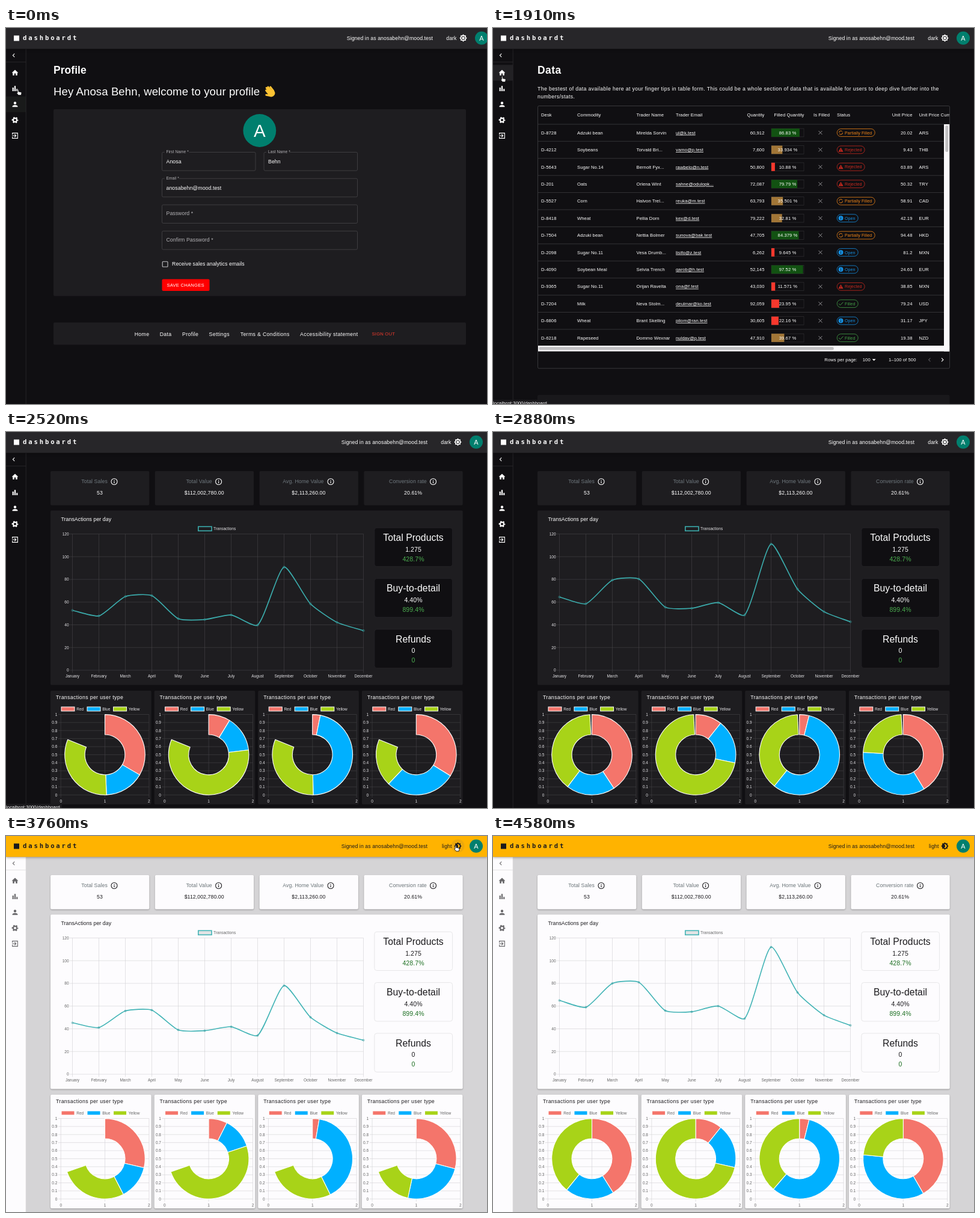
These frames come from a looping animation (800x625 px, 4.61 s). An HTML page:

```html
<!DOCTYPE html>
<html lang="en">
<head>
<meta charset="utf-8">
<title>Dashboard tour</title>
<style>
  html, body { margin: 0; width: 100%; height: 100%; overflow: hidden; background: #100f12; }
  svg { display: block; width: 800px; height: 625px; font-family: "Liberation Sans", Arial, sans-serif; }
  text { white-space: pre; }
  .dark {
    --bg: #100f12; --bar: #272629; --side: #100f12; --edge: #2c2b2e; --card: #1e1d20; --tile: #100f12;
    --tileEdge: #29282b; --fg: #fff; --icon: #fff; --muted: #70797f; --grid: #454447; --tick: #e4e3e6;
    --good: #4caf50; --hover: #3a393c; --teal: #3bacac; --key: none;
  }
  .light {
    --bg: #d5d4d6; --bar: #ffb300; --side: #fdfcfe; --edge: #dddcde; --card: #fdfcfe; --tile: #fdfcfe;
    --tileEdge: #dfdee0; --fg: #1b1a1d; --icon: #69686b; --muted: #697377; --grid: #d2d1d3; --tick: #666;
    --good: #1b6e20; --hover: #eda90c; --teal: #43b4b6; --key: #e2e3e4;
  }
  .card { fill: var(--card); }
  .light .card { filter: drop-shadow(0 1px 1px rgba(0, 0, 0, .3)); }
  .bar { filter: drop-shadow(0 1px 2px rgba(0, 0, 0, .35)); }
  .light .darkOnly, .dark .lightOnly { display: none; }
</style>
</head>
<body>
<svg id="stage" class="dark" viewBox="0 0 800 625"></svg>
<script>
const LOOP = 4610;
const TIME = { data: 300, dash: 2180, light: 3503 };
const RED = '#f4756b', BLUE = '#00b0ff', LIME = '#a8d318', GREEN = '#007f6e';
const USER = { first: 'Anosa', last: 'Behn', email: 'anosabehn@mood.test' };

const stage = document.getElementById('stage');
const $ = id => document.getElementById(id);
const each = (list, fn) => list.map(fn).join('');

// Markup helpers
const text = (x, y, str, o = {}) => `<text x="${x}" y="${y}" font-size="${o.size || 8.72}"
  fill="${o.fill || 'var(--fg)'}" text-anchor="${o.anchor || 'start'}" letter-spacing="${o.ls ?? 0.08}"
  ${o.extra || ''}>${str.replace('&', '&amp;')}</text>`;
const rect = (x, y, w, h, fill, extra = '') =>
  `<rect x="${x}" y="${y}" width="${w}" height="${h}" fill="${fill}" ${extra}/>`;
const card = (x, y, w, h) => rect(x, y, w, h, '', 'rx="2" class="card"').replace('fill=""', '');
const circle = (x, y, r, fill, extra = '') => `<circle cx="${x}" cy="${y}" r="${r}" fill="${fill}" ${extra}/>`;
const path = (d, extra) => `<path d="${d}" ${extra}/>`;
const line = (d, stroke, width = 0.6) => path(d, `fill="none" stroke="${stroke}" stroke-width="${width}"`);
const icon = (x, y, body, fill = 'var(--icon)', k = 0.545) =>
  `<g transform="translate(${x} ${y}) scale(${k}) translate(-12 -12)" fill="${fill}">${body}</g>`;
const shape = d => `<path d="${d}"/>`;

const gear = circle(12, 12, 5.4, 'none', 'stroke="var(--icon)" stroke-width="3.6"') +
  circle(12, 12, 8.2, 'none', 'stroke="var(--icon)" stroke-width="3.4" stroke-dasharray="4.6 3.987" stroke-dashoffset="2.3"');
const chevronLeft = shape('M15.4 7.4L14 6l-6 6 6 6 1.4-1.4L10.8 12z');
const chevronRight = shape('M8.6 16.6L10 18l6-6-6-6-1.4 1.4 4.6 4.6z');
const sun = 'M20 8.7V4h-4.7L12 .7 8.7 4H4v4.7L.7 12 4 15.3V20h4.7l3.3 3.3 3.3-3.3H20v-4.7l3.3-3.3z';
const info = (x, y) => circle(x, y, 5, 'none', 'stroke="var(--fg)" stroke-width="1.1"') +
  line(`M${x} ${y - 0.7}v3.4M${x} ${y - 2.8}v1.2`, 'var(--fg)', 1.1);

function header() {
  return rect(0, 0, 800, 34.7, 'var(--bar)', 'class="bar"') +
    rect(13, 12.5, 9, 9, 'var(--fg)') +
    text(28, 20.3, 'dashboardt', { size: 10.6, ls: 2.85, extra: 'font-weight="700" font-family="DejaVu Sans Mono, monospace"' }) +
    `<g id="account">${text(701, 19.6, 'Signed in as ' + USER.email, { anchor: 'end' })}
      ${circle(751.5, 16.5, 11, 'var(--hover)', 'id="halo"')}
      <g class="darkOnly">${text(740.5, 19.6, 'dark', { anchor: 'end' })}
        ${icon(751.5, 16.7, shape(sun) + circle(12, 12, 5, 'none', 'stroke="var(--bar)" stroke-width="2"'), '#fff')}</g>
      <g class="lightOnly">${text(741.5, 19.6, 'light', { anchor: 'end' })}
        ${icon(751.5, 16.7, shape(sun) + path('M9.5 6.5a6 6 0 1 1 0 11a6 6 0 0 0 0-11z', 'fill="var(--bar)"'), 'var(--fg)')}</g>
      ${circle(782, 16.7, 11, GREEN)}${text(782, 20.7, 'A', { size: 10.9, anchor: 'middle', fill: '#fff' })}</g>`;
}

function sidebar() {
  return rect(0, 35, 33, 590, 'var(--side)') + rect(0, 0, 33, 26.2, '#1a1a1b', 'id="row"') +
    line('M33.2 35V625M0 56.6H33', 'var(--edge)', 0.8) +
    icon(12.8, 45.4, chevronLeft) +
    icon(15, 74.5, shape('M10 20v-6h4v6h5v-8h3L12 3 2 12h3v8z')) +
    icon(15, 100.7, shape('M4 9h4v11H4zm12 4h4v7h-4zm-6-9h4v16h-4z')) +
    icon(15, 126.9, circle(12, 8, 4, 'inherit') .replace('fill="inherit"', '') + shape('M12 14c-2.7 0-8 1.3-8 4v2h16v-2c0-2.7-5.3-4-8-4z')) +
    icon(15, 153, gear) +
    icon(15, 179, shape('M10 15.6L11.5 17l5-5-5-5L10 8.4l2.6 2.6H3v2h9.6z') +
      path('M4 9V4h16v16H4v-5', 'fill="none" stroke="var(--icon)" stroke-width="2"'));
}

function profile() {
  const field = (x, y, w, label, value) => {
    const box = rect(x, y, w, 30.6, 'none', 'rx="2" stroke="#4c4b4e" stroke-width=".7"');
    const grey = { fill: '#b4b3b6' };
    if (!value) return box + text(x + 7, y + 17.2, label + ' *', { ...grey, ls: 0.06 });
    return box + rect(x + 4, y - 1, label.length * 3.3 + 8, 2, 'var(--card)') +
      text(x + 7, y + 1.8, label + ' *', { ...grey, size: 6.54 }) + text(x + 7, y + 18.6, value);
  };
  const links = [[213.7, 'Home'], [255.7, 'Data'], [293, 'Profile'], [337.5, 'Settings'],
    [389.7, 'Terms & Conditions'], [489, 'Accessibility statement']];
  const wave = `<g transform="translate(439.5 106) rotate(-38)" stroke="#fcc233" stroke-linecap="round" stroke-width="3">
    <path d="M-4 2V-6M-1 1V-9M2 1V-8.5M5 2V-6M-5 4L-8.5 0"/><ellipse cy="3.5" rx="4.5" ry="4" fill="#fcc233"/></g>`;
  return text(79, 76, 'Profile', { size: 17.45, extra: 'font-weight="700"' }) +
    text(79, 111.6, `Hey ${USER.first} ${USER.last}, welcome to your profile`, { size: 18.6 }) + wave +
    card(79, 135, 686, 310.5) + circle(421.8, 170.5, 27.4, GREEN) +
    text(421.8, 181.2, 'A', { size: 29.5, anchor: 'middle' }) +
    field(259.5, 206.5, 155.5, 'First Name', USER.first) + field(429, 206.5, 155.5, 'Last Name', USER.last) +
    field(259.5, 250.2, 325, 'Email', USER.email) + field(259.5, 293.9, 325, 'Password') +
    field(259.5, 337.6, 325, 'Confirm Password') +
    rect(260.2, 388.2, 8.8, 8.8, 'none', 'rx="1" stroke="#c4c3c6" stroke-width="1.1"') +
    text(276, 395.2, 'Receive sales analytics emails') +
    rect(259.5, 417.5, 79, 19.6, '#f00', 'rx="2"') + text(267.5, 429.9, 'SAVE CHANGES', { size: 7.63, ls: 0.22 }) +
    card(79, 489.5, 686, 37) + each(links, ([x, s]) => text(x, 511.6, s, { ls: 0.36 })) +
    text(608.5, 511.2, 'SIGN OUT', { size: 7.63, ls: 0.22, fill: '#ef3a2d' });
}

const TRADES = `D-8728|Adzuki bean|Mirelda Sorvin|ul@k.test|60,912|86.83|P|20.02|ARS
D-4212|Soybeans|Torvald Bri...|vamo@p.test|7,600|33.934|R|9.43|THB
D-5643|Sugar No.14|Bernolt Fyx...|rawbelo@n.test|50,800|10.88|R|63.89|ARS
D-201|Oats|Orlena Wint|sahne@odulopk...|72,087|79.79|R|50.32|TRY
D-5527|Corn|Halvon Trel...|reuka@m.test|63,793|35.501|P|58.91|CAD
D-8418|Wheat|Pellia Dorn|kex@d.test|79,222|32.81|O|42.19|EUR
D-7504|Adzuki bean|Nettia Bolmer|sunova@bak.test|47,705|84.379|P|94.48|HKD
D-2098|Sugar No.11|Vesa Drumb...|lisifo@z.test|6,262|9.645|O|81.2|MXN
D-4090|Soybean Meal|Selvia Trench|garob@h.test|52,145|97.52|O|24.63|EUR
D-9365|Sugar No.11|Orijan Ravelta|ona@f.test|43,030|11.571|R|38.85|MXN
D-7204|Milk|Neva Stolm...|deulmar@ko.test|92,059|23.95|F|79.24|USD
D-6806|Wheat|Brant Skelling|pilom@ran.test|30,605|22.16|O|31.17|JPY
D-6218|Rapeseed|Dommo Wexnar|nuldav@p.test|47,910|39.67|F|19.38|NZD`.split('\n').map(r => r.split('|'));

const CHIPS = {
  P: ['Partially Filled', 63, '#ec8419', (x, y, c) => circle(x, y, 3, 'none', `stroke="${c}" stroke-dasharray="7.4 2"`)],
  R: ['Rejected', 46, '#c8291f', (x, y, c) => path(`M${x} ${y - 3.6}l4 7h-8z`, `fill="${c}"`) + line(`M${x} ${y - 1}v2.2m0 .6v.8`, '#100f12', 0.8)],
  O: ['Open', 35, '#158fe0', (x, y, c) => circle(x, y, 4, c) + line(`M${x} ${y - 0.4}v2.6m0-4.6v1`, '#100f12', 0.8)],
  F: ['Filled', 35, '#43a047', (x, y, c) => line(`M${x - 3.5} ${y}l2.5 2.5l5-5`, c, 1)]
};

function dataPage() {
  const cell = (x, y, s, o) => text(x, y, s, { size: 7.63, ...o });
  const end = { anchor: 'end' }, wide = { ls: 0.37 };
  const row = ([desk, goods, trader, email, qty, filled, status, price, money], i) => {
    const c = 174 + i * 28.42, y = c + 2.7;
    const [label, w, color, mark] = CHIPS[status];
    const fill = filled > 70 ? '#125212' : filled > 30 ? '#a17637' : '#f8382d';
    return cell(80, y, desk) + cell(140, y, goods) + cell(238.5, y, trader) +
      cell(304, y, email, { extra: 'text-decoration="underline"' }) + cell(451.5, y, qty, end) +
      rect(463, c - 6.9, 54, 13.8, 'none', 'stroke="#353437" stroke-width=".6"') +
      rect(463, c - 6.9, 0.54 * filled, 13.8, fill) + cell(490, y, filled + ' %', { anchor: 'middle' }) +
      line(`M541.5 ${c - 3}l6 6m0-6l-6 6`, '#a3a2a5', 0.9) +
      rect(572.2, c - 6.4, w, 12.8, 'none', `rx="6.4" stroke="${color}" stroke-width=".8"`) +
      mark(578.5, c, color) + text(585, c + 2.6, label, { size: 7.08, fill: color }) +
      cell(697.5, y, price, end) + cell(708.5, y, money) +
      (i < 12 ? line(`M75 ${c + 14.3}H750`, '#434245', 0.7) : '');
  };
  const heads = [[80, 'Desk'], [140, 'Commodity'], [238.5, 'Trader Name'], [304, 'Trader Email'], [451.5, 'Quantity', end],
    [517.5, 'Filled Quantity', end], [533, 'Is Filled'], [572, 'Status'], [697.5, 'Unit Price', end], [708.5, 'Unit Price Curr']];
  return text(74, 76, 'Data', { size: 17.45, ls: 0.5, extra: 'font-weight="700"' }) +
    text(74, 103.8, 'The bestest of data available here at your finger tips in table form. This could be a whole section of data that is available for users to deep dive further into the', wide) +
    text(74, 117.2, 'numbers/stats.', wide) +
    `<clipPath id="table"><rect x="74" y="129" width="685.3" height="438"/></clipPath>
     <g clip-path="url(#table)">${each(heads, h => cell(h[0], 147, h[1], h[2]))}</g>` +
    line('M75 160H759', '#434245', 0.7) + each(TRADES, row) +
    rect(750, 160, 9.4, 377.5, '#f9f8fa') + rect(752.3, 162, 5, 44, '#c1c0c2', 'rx="2.5"') +
    rect(75, 528, 684.4, 9.5, '#f9f8fa') + rect(76.3, 530.3, 490.5, 5, '#c1c0c2', 'rx="2.5"') +
    rect(74.5, 129.5, 685, 436.3, 'none', 'rx="2" stroke="#4a494c" stroke-width=".7"') +
    cell(551.3, 554.2, 'Rows per page:') + cell(614.8, 554.2, '100') +
    path('M630.6 550.2h6l-3 3z', 'fill="#fff"') + cell(658, 554.2, '1–100 of 500') +
    icon(726, 551.4, chevronLeft, '#59585b') + icon(747.5, 551.4, chevronRight, '#fff') +
    rect(74, 610, 685.5, 20, '#19181b', 'rx="2"');
}

// Line chart geometry
const MONTHS = ['January', 'February', 'March', 'April', 'May', 'June', 'July', 'August', 'September', 'October', 'November', 'December'];
const DEALS = [65, 59, 80, 81, 56, 55, 60, 49, 112, 72, 52, 43];
const monthX = i => 110.5 + 44 * i;
const dealY = v => 396 - v * 1.8875;

// End angles of the red and blue slices
const RINGS = [[148, 219], [38.7, 102.6], [14, 220.5], [150, 275.5]];
const ringX = i => 74 + 172.6 * i;

function dashboard() {
  const small = { size: 6.54, ls: 0, fill: 'var(--tick)' };
  const mid = { anchor: 'middle' };
  const stats = [['Total Sales', 125.3, 180, '53'], ['Total Value', 299.4, 353.6, '$112,002,780.00'],
    ['Avg. Home Value', 460.3, 540, '$2,113,260.00'], ['Conversion rate', 637, 710.5, '20.61%']];
  const tiles = [['Total Products', '1.275', '428.7%'], ['Buy-to-detail', '4.40%', '899.4%'], ['Refunds', '0', '0']];
  const steps = n => [...Array(n).keys()];
  const ring = i => {
    const x = ringX(i), left = x + 17.2;
    return card(x, 430, 167.7, 189) + text(x + 9, 443.6, 'Transactions per user type', { ls: 0.36 }) +
      each([['Red', 18, RED], ['Blue', 61, BLUE], ['Yellow', 104.6, LIME]], ([s, dx, color]) =>
        rect(x + dx, 457, 22, 6.9, color, 'stroke="#fff" stroke-width="1"') + text(x + dx + 25.2, 462.8, s, small)) +
      each(steps(11), k => line(`M${left - 4.4} ${603.3 - 13.38 * k}H${left + 146.7}`, 'var(--grid)') +
        text(left - 5.8, 605.6 - 13.38 * k, String(k / 10), { ...small, anchor: 'end' })) +
      each(steps(3), k => line(`M${left + 73.35 * k} 469.5V607.5`, 'var(--grid)') +
        text(left + 73.35 * k, 616.2, String(k), { ...small, ...mid }));
  };
  return each(stats, ([label, x, ix, value], i) => card(74 + 173.8 * i, 65, 164.3, 56.7) +
      text(x, 85.3, label, { fill: 'var(--muted)' }) + info(ix, 82.5) + text(156 + 173.7 * i, 104.4, value, mid)) +
    card(74, 130.5, 685.7, 290) + text(91.5, 148.3, 'TransActions per day') +
    rect(319.8, 157.3, 22.2, 7, 'var(--key)', 'stroke="var(--teal)" stroke-width="1.6"') + text(345, 163.2, 'Transactions', small) +
    each(steps(7), k => line(`M106 ${dealY(20 * k)}H594.5`, 'var(--grid)') +
      text(104.6, dealY(20 * k) + 2.3, String(20 * k), { ...small, anchor: 'end' })) +
    each(MONTHS, (m, i) => line(`M${monthX(i)} 169.5V400.4`, 'var(--grid)') + text(monthX(i), 408.4, m, { ...small, ...mid })) +
    each(tiles, ([name, value, pct], i) => {
      const y = 159.2 + 84.4 * i;
      return rect(612.8, y, 129.8, 64.4, 'var(--tile)', 'rx="4" stroke="var(--tileEdge)" stroke-width=".7"') +
        text(677.5, y + 21.8, name, { size: 15.7, ...mid }) + text(677.5, y + 39.4, value, { size: 10.5, ...mid }) +
        text(677.5, y + 55.3, pct, { size: 10.5, fill: 'var(--good)', ...mid });
    }) +
    each(steps(4), ring) + '<g id="plot"></g>';
}

function curve(pts, tension = 0.2) {
  const handles = pts.map(([x, y], i) => {
    const [px, py] = pts[i - 1] || pts[i], [nx, ny] = pts[i + 1] || pts[i];
    const before = Math.hypot(x - px, y - py), after = Math.hypot(nx - x, ny - y);
    const a = tension * before / (before + after), b = tension - a;
    return [x - a * (nx - px), y - a * (ny - py), x + b * (nx - px), y + b * (ny - py)];
  });
  return `M${pts[0]}` + each(pts.slice(1), (p, i) => `C${handles[i].slice(2)} ${handles[i + 1].slice(0, 2)} ${p}`);
}

function slice(cx, from, to, color) {
  const at = (r, deg) => {
    const a = deg * Math.PI / 180;
    return `${cx + r * Math.sin(a)} ${536.4 - r * Math.cos(a)}`;
  };
  const big = to - from > 180 ? 1 : 0;
  return path(`M${at(66.8, from)}A66.8 66.8 0 ${big} 1 ${at(66.8, to)}L${at(33.4, to)}A33.4 33.4 0 ${big} 0 ${at(33.4, from)}Z`,
    `fill="${color}" stroke="#fff" stroke-width="1.1" stroke-linejoin="round"`);
}

function plot(p) {
  const pts = DEALS.map((v, i) => [monthX(i), dealY(v * p)]);
  return line(curve(pts), 'var(--teal)', 1.64) +
    each(pts, ([x, y]) => circle(x, y, 1.6, 'rgba(0,0,0,.1)', 'stroke="var(--teal)" stroke-width=".6"')) +
    each(RINGS, ([a, b], i) => {
      const cx = ringX(i) + 90.5;
      return slice(cx, 0, a * p, RED) + slice(cx, a * p, b * p, BLUE) + slice(cx, b * p, 360 * p, LIME);
    });
}

stage.innerHTML = rect(0, 0, 800, 625, 'var(--bg)') +
  `<g id="profile">${profile()}</g><g id="data">${dataPage()}</g><g id="dash">${dashboard()}</g>` +
  sidebar() + header() +
  `<g id="status">${rect(0, 618, 126, 7, '#1b1a1d', 'id="statusBox"')}${text(0, 625.7, '', { size: 7.7, extra: 'id="link"' })}</g>` +
  `<g id="hand">${path('M1.6 1Q2.6 0 3.5 1V4.3L7.6 5Q8.6 5.4 8.4 7L7.7 10.2H3.2L.3 6.7Q.2 5.5 1.6 6Z', 'fill="#fff" stroke="#000" stroke-width=".8"')}</g>`;

// Pointer stops: time, x, y
const POINTER = [[0, 17.5, 101.5], [1570, 17.5, 101.5], [1850, 12.7, 79.5], [2250, 12.7, 79.5], [2450, 60, -14],
  [3200, 700, -14], [3420, 745.5, 15], [LOOP, 745.5, 15]];

function pointerAt(t) {
  const i = POINTER.findIndex(s => s[0] > t);
  const [t0, x0, y0] = POINTER[i - 1], [t1, x1, y1] = POINTER[i];
  const u = (t - t0) / (t1 - t0), e = u * u * (3 - 2 * u);
  return [x0 + (x1 - x0) * e, y0 + (y1 - y0) * e];
}

const show = (id, on) => { $(id).style.display = on ? '' : 'none'; };
const grow = ms => 1 - (1 - Math.min(1, Math.max(0, ms / 1000))) ** 4;

function render(t) {
  const light = t >= TIME.light;
  const page = t < TIME.data ? 'profile' : t < TIME.dash ? 'data' : 'dash';
  stage.setAttribute('class', light ? 'light' : 'dark');
  for (const id of ['profile', 'data', 'dash']) show(id, id === page);
  if (page === 'dash') $('plot').innerHTML = plot(grow(t - (light ? TIME.light : TIME.dash)));
  $('account').setAttribute('transform', `translate(${page === 'profile' ? 9 : 0} 0)`);

  const [y, color] = t < TIME.data ? [113.7, '#191a1a'] : t < 1750 ? [87.5, '#181a2b'] : [61.3, '#222124'];
  $('row').setAttribute('y', y);
  $('row').setAttribute('fill', color);
  show('row', t < 2300);

  const home = t >= 1750;
  $('link').textContent = 'localhost:3000/dashboard' + (home ? '' : '/analytics');
  $('statusBox').setAttribute('width', home ? 93 : 126);
  show('status', t >= 400 && t < 2750);

  $('hand').setAttribute('transform', `translate(${pointerAt(t)})`);
  show('hand', t < 4200);
  show('halo', t >= 3370 && t < 4200);
}

const start = performance.now();
function tick() {
  render((performance.now() - start) % LOOP);
  requestAnimationFrame(tick);
}
tick();
</script>
</body>
</html>
```
